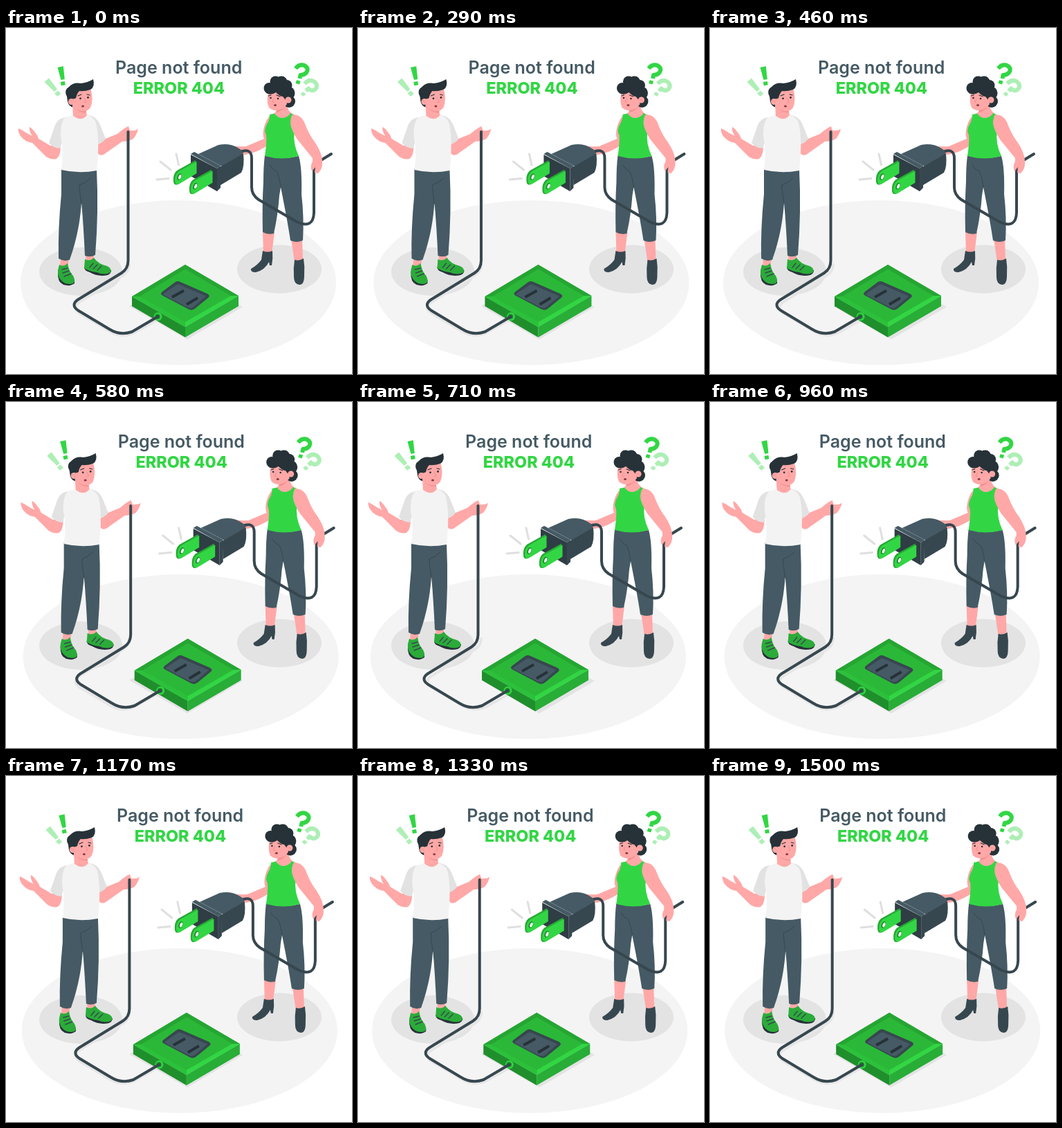
Write an HTML page that moves like this. It is 500x500 px and loops after 1540 ms.

```html
<!DOCTYPE html>
<html lang="en">
<head>
<meta charset="utf-8">
<title>Page not found</title>
<style>
html, body { margin: 0; width: 100%; height: 100%; overflow: hidden; background: #fff; }
svg { display: block; width: 100%; height: 100%; }
text { font-family: Inter, Roboto, sans-serif; text-anchor: middle; }
.skin { fill: #ffa8a7; }
.hair { fill: #263238; }
.slate { fill: #455a64; }
.dark { fill: #37474f; }
.green { fill: #32d644; }
.pale { fill: #adefb5; }
.shirt { fill: #f3f3f3; }
.sleeve { fill: #e2e2e2; }
.shade { fill: #e3e3e3; }
.line { fill: none; stroke-linecap: round; stroke-linejoin: round; }
.cable { stroke: #37474f; stroke-width: 4; }
.fold { stroke: #37474f; stroke-width: 1; }
.ink { stroke: #263238; stroke-width: 1.2; }
.lace { stroke: #37474f; stroke-width: 1.4; }
.blush { stroke: #f28f8f; stroke-width: 1; }
</style>
</head>
<body>
<svg viewBox="0 0 500 500">
  <g class="sway">
    <ellipse cx="249" cy="368" rx="228" ry="119" fill="#f4f4f4"/>
  </g>

  <g class="shade">
    <ellipse cx="108" cy="352" rx="60" ry="35"/>
    <ellipse cx="395" cy="348.500" rx="61" ry="35"/>
    <path d="M178 402L259 356L342 403L262 450Z"/>
    <path class="line" stroke="#e6e6e6" stroke-width="4" d="M178 342Q178 352 168 358L106 396Q95 404 106 412L150 438Q167 448 184 441L222 420"/>
  </g>

  <g class="sway">
    <text class="slate" x="249.700" y="66" font-size="25" font-weight="600">Page not found</text>
    <text class="green" x="250" y="95" font-size="23.400" font-weight="800">ERROR 404</text>

    <g id="marks">
      <path class="green" d="M74.500 57L82.800 55.200L84.800 74L79.500 75ZM78.800 78L84.800 77L85.800 82.200L79.800 83.200Z"/>
      <path class="pale" d="M55.500 78L62 72.500L74 88.500L69.800 92ZM70 94.500L75 90.500L79.300 95L74.500 99Z"/>
      <g class="line" stroke-width="6" style="stroke-linecap:butt">
        <path stroke="#32d644" d="M418.500 58.500Q424 51.500 431 54Q438.500 58 434 64.500Q431 68 425.500 68L424.500 73"/>
        <path stroke="#adefb5" d="M431.500 80.500Q438 73 445.500 77.500Q452 83 447 88.500Q442 92.500 437 87.500L433.500 91"/>
      </g>
      <path class="green" d="M420 75.300L425.500 76.800L424 81.500L418.500 80Z"/>
      <path class="pale" d="M429 92L433.500 95.500L430 99L425.500 95.500Z"/>
    </g>

    <g id="man">
      <path class="skin" d="M79 170Q79 185 73 189Q66 191 58 186L38 166Q28 165 21 156Q17 150 18 145Q23 147 30 152L38 156Q33 149 34 143Q38 145 42 151Q46 155 47 160L64 170Z"/>
      <path class="skin" d="M131 166L144 160L161 153Q170 145 177 142L179 148Q186 149 191 146Q189 154 184 160Q177 164 168 164L141 183Q133 186 131 177Z"/>
      <path class="skin" d="M79 332L78 344L89 345L91 333ZM115 328L116 338L127 336L127 328Z"/>
      <path class="hair" d="M75 353Q74 367 83 371Q93 374 99 369L99 364L76 349ZM113 345Q112 350 121 353Q133 360 147 357Q152 355 152 350Z"/>
      <path fill="#2bab39" d="M77 342Q83 346 89 340Q91 352 97 358Q101 366 97 369Q87 372 80 365Q74 359 75 350Z"/>
      <path fill="#2bab39" d="M114 334Q121 338 127 332Q133 341 146 344Q153 347 151 353Q143 358 131 353Q121 352 113 347Z"/>
      <path class="line lace" d="M81 349L89 347M82 354L91 351M84 359L94 355M121 346L126 340M126 348L132 342M132 350L138 344"/>
      <path class="slate" d="M80 203Q105 211 131 205Q134 265 129 328Q122 332 114 329Q112 285 109 252C107 286 99 316 92 335Q83 338 76 333Q75 290 80 240Z"/>
      <path class="line fold" d="M109 254Q106 234 106 227Q115 224 122 217"/>
      <path class="sleeve" d="M87 129Q73 130 69 146L62 166Q67 173 78 174L86 150ZM117 126Q130 126 136 140L144 160Q140 166 131 169Q128 148 117 126Z"/>
      <path class="shirt" d="M85 130Q92 126 99 126Q107 133 116 126Q126 127 130 137Q136 160 131 206Q105 211 80 205Q84 180 79 156Q79 136 85 130Z"/>
      <path class="skin" d="M96 110L115 116L117 126Q109 136 97 127Z"/>
      <path fill="#f28f8f" d="M100 116Q107 121 116 120L116 122Q107 123 100 116Z"/>
      <path class="skin" d="M94 92L122 87Q127 103 122 115Q117 122 109 120Q101 118 97 111Z"/>
      <path class="hair" d="M88 99Q83 90 91 85Q98 78 108 80Q118 79 126 74Q129 85 122 89Q113 92 106 91Q102 95 101 102L98 115Q90 113 89 106Z"/>
      <circle class="skin" cx="94.500" cy="106.500" r="4.500"/>
      <path class="skin" d="M96 103L102 101L102 116L96 115Z"/>
      <circle class="hair" cx="107.500" cy="101.800" r="1.400"/>
      <circle class="hair" cx="118.500" cy="100.500" r="1.400"/>
      <path class="line ink" d="M104 98L109 96M117 96L121 97"/>
      <path class="line blush" d="M113 101L116 107L113 108M92 105Q95 104 96 108"/>
      <ellipse cx="111" cy="113" rx="2" ry="1.500" fill="#8a3940"/>
    </g>

    <g id="box">
      <path fill="#1f8f2c" d="M182 388L259 432V447L182 402Z"/>
      <path fill="#28ad37" d="M336 387L259 432V447L336 402Z"/>
      <path fill="#2bb838" d="M182 388L259 342L336 387L259 432Z"/>
      <path fill="#26a533" d="M182 388L259 342L336 387L325 387L259 348.500L193 388Z"/>
      <path class="green" d="M336 387L259 432L259 425L325 387Z"/>
      <path fill="#2cc13b" d="M182 388L259 432L259 425L193 388Z"/>
      <path class="dark" d="M226 381L244 367.500Q248 365 252 367L291 384Q296 387 292 390L273 405.500Q268 409 263 406L226 386.500Q222 384 226 381Z"/>
      <path class="slate" d="M229 383L246 371.500Q248 370 251 371L289 387.500L271 403Q268 406 263 404L228 386Q226 385 229 383Z"/>
      <path class="line" stroke="#263238" stroke-width="4" style="stroke-linecap:butt" d="M240 389L257 379.500M261 399.500L277 390"/>
      <circle class="green" cx="219.500" cy="417" r="6"/>
      <circle cx="219" cy="417" r="3.800" fill="#1d892a"/>
    </g>
    <path class="line cable" d="M176.500 150V336Q176.500 348 167 354L104 392.500Q93 400 104 408L149 435Q165 445 182 439L219.500 417"/>

    <path class="line" stroke="#dfdfdf" stroke-width="3" d="M223 193L238 205M246 182L249.500 198M218 219L235 217.500"/>

    <g id="woman">
      <path class="skin" d="M386 125Q378 126 373 143Q370 154 373 160L347 171Q336 172 322 170L324 177L330 182L346 183Q364 180 382 167Z"/>
      <path class="skin" d="M371 294L388 295Q386 311 384 326L372 326ZM412 305L428 305L429 337L417 338Z"/>
      <path class="dark" d="M371 322Q378 325 385 322Q386 333 384 343L381 343L380 338Q374 350 361 353Q353 353 354 348Q363 343 369 335Z"/>
      <path class="dark" d="M417 335Q424 337 430 333Q432 345 431 358Q431 371 424 371Q416 370 416 360Q415 347 417 335Z"/>
      <path class="slate" d="M374 184Q400 191 423 185Q428 202 427 240Q431 275 429 307Q420 311 411 307Q407 280 397 230L395 242Q393 270 387 297Q378 299 371 295Q370 255 372 222Q372 200 374 184Z"/>
      <path class="line fold" d="M397 230Q395 214 391 207Q385 205 381 198"/>
      <path class="skin" d="M391 112L406 109Q406 121 417 126L414 140L387 138L384 126Q392 123 391 112Z"/>
      <path class="green" d="M381 125L388 123.500Q393 131 401 130Q409 128 411 123L416 125Q410 138 417 149Q414 166 423 185Q399 192 374 185Q377 165 376 155Q372 148 377 139Q381 133 381 125Z"/>
      <g class="hair">
        <circle cx="380.500" cy="87" r="8"/>
        <circle cx="389.500" cy="77.500" r="8"/>
        <circle cx="398" cy="78" r="8.500"/>
        <circle cx="405.500" cy="83" r="8"/>
        <circle cx="408" cy="94" r="9.500"/>
        <circle cx="409" cy="106" r="9"/>
      </g>
      <path class="skin" d="M379 93Q376 106 380 115Q387 121 394 118Q402 116 406 110L403 91Q391 85 379 93Z"/>
      <path class="hair" d="M376 94Q383 98 390 93Q396 99 400 99L404 104L410 98L407 84L382 82Z"/>
      <circle class="skin" cx="408" cy="104" r="4.500"/>
      <path fill="#f28f8f" d="M391 119Q399 118 404 113Q399 120 391 122Z"/>
      <circle class="hair" cx="382.500" cy="101" r="1.300"/>
      <circle class="hair" cx="393" cy="102" r="1.300"/>
      <path class="line ink" d="M379.500 98L383 97M391 97L396 99"/>
      <path class="line blush" d="M387 102L384.500 107L387 108M406 104Q409 102 410 106"/>
      <ellipse cx="389" cy="111.500" rx="2" ry="1.500" fill="#8a3940"/>
    </g>

    <path class="line cable" d="M336 180Q355 172 355 188V230Q355 241 365 248L420 280Q444 291 445 267V208Q445 198 452 193L470 182"/>
    <path class="skin" d="M414 125Q428 125 433 141Q438 154 447 166Q457 181 457 193Q458 203 451 210L446 209L447 201L442 207Q439 199 443 193L443 188L421 161Q412 147 411 138Q411 130 414 125Z"/>

    <g id="plug">
      <path class="slate" d="M278 182L307 169Q322 166 333 172Q343 177 343 183L312 200Z"/>
      <path class="dark" d="M309 201L335 186Q341 182 343 182Q345 200 340 209L310 227Z"/>
      <path fill="#2f3d44" d="M267 183L305 203V236L267 214Z"/>
      <path class="slate" d="M267 182L272 179L310 199L305 203Z"/>
      <path class="dark" d="M305 203L310 199V231L305 236Z"/>
      <g id="prong">
        <path fill="#27a835" d="M274 191L247 206Q241 211 242 222Q243 228 248 226L275 210Z"/>
        <path class="green" d="M275.500 193L250 207Q244 211 244 221Q245 228 250 225.500L275.500 210Z"/>
        <ellipse cx="250.500" cy="215" rx="2.800" ry="5" fill="#1d892a" transform="rotate(20 250.500 215)"/>
        <ellipse cx="251.200" cy="215.200" rx="1.800" ry="3.600" fill="#fff" transform="rotate(20 251.200 215.200)"/>
      </g>
      <use href="#prong" x="23" y="13.500"/>
    </g>
  </g>
</svg>
<script>
const LOOP = 1540, CYCLE = 1500, TICK = 125 / 3, LEAD = 26;
const SHAKE = [0, -1, 2, -4, 4, -4, 4, -4, 2, -1, 0];
const layers = document.querySelectorAll('.sway');
const start = performance.now();

// Linear shake with a stop at every tenth of the cycle
function offset(ms) {
  const p = Math.min(ms / CYCLE, 1) * 10;
  const i = Math.min(Math.floor(p), 9);
  return SHAKE[i] + (SHAKE[i + 1] - SHAKE[i]) * (p - i);
}

const rest = offset(LEAD);

function draw() {
  const t = (performance.now() - start) % LOOP;
  const tick = Math.min(Math.floor((t + 4.9) / TICK), 36);
  const x = offset(tick * TICK + LEAD) - rest;
  layers.forEach(g => g.setAttribute('transform', `translate(${x.toFixed(3)} 0)`));
  requestAnimationFrame(draw);
}
draw();
</script>
</body>
</html>
```
